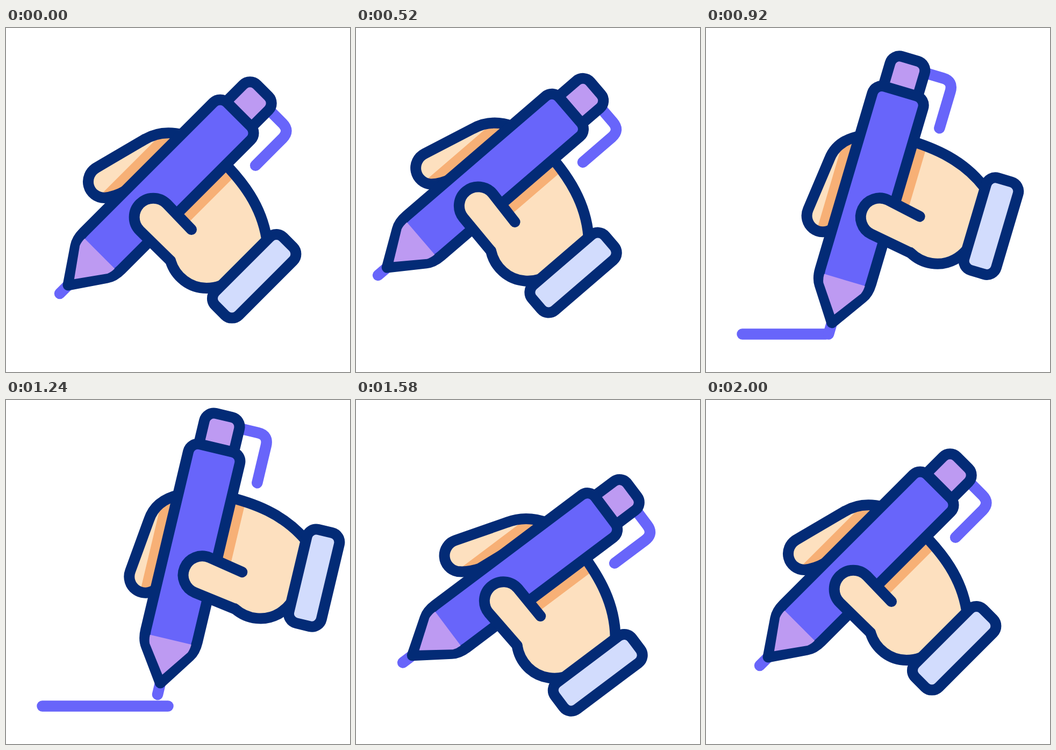
An HTML page that plays this animation: 640x640 px, repeating every 2320 ms.

```html
<!DOCTYPE html>
<html lang="en">
<head>
<meta charset="utf-8">
<title>Writing hand</title>
<style>
  html, body { margin: 0; width: 100%; height: 100%; overflow: hidden; background: #fff; }
  svg { display: block; width: 100%; height: 100%; }
  .outline { stroke: #032b76; stroke-width: 20; }
  .ink { stroke: #6865fa; stroke-width: 20.5; fill: none; }
  .skin { fill: #fde0bf; }
  .lilac { fill: #bd9af2; }
</style>
</head>
<body>
<svg viewBox="0 0 640 640" fill="none" stroke-linecap="round" stroke-linejoin="round">
  <defs>
    <path id="finger"/>
    <path id="palm" d="M300 340 L400 245 C440 285 475 330 485 392 L490 397 L405 484 L400 479 Q387 484 373 484 C342 484 315 463 306 433"/>
    <clipPath id="hand"><use href="#finger"/><use href="#palm"/></clipPath>
  </defs>

  <path id="line" class="ink"/>

  <!-- the origin of this group is the tip of the refill -->
  <g id="rig">
    <g transform="translate(-100 -494)">
      <g class="skin"><use href="#finger"/><use href="#palm"/></g>
      <g clip-path="url(#hand)">
        <rect transform="translate(100 494) rotate(-45)" y="-76" width="500" height="152" fill="#f7b076"/>
      </g>
      <g class="outline"><use href="#finger"/><use href="#palm"/></g>
    </g>

    <g transform="rotate(-45)">
      <path class="ink" d="M0 0 H22 M517 40 V69 Q517 89 497 89 H426"/>
      <g class="outline">
        <rect class="lilac" x="440" y="-33.4" width="94" height="66.8" rx="18"/>
        <path fill="#6865fa" d="M22 0 L83 -41.500 Q94 -49.200 112 -49.200 H453.300 A18 18 0 0 1 471.300 -31.200 V31.200 A18 18 0 0 1 453.300 49.200 H112 Q94 49.200 83 41.500 Z"/>
      </g>
      <path class="lilac" d="M38 0 L89 -36.500 Q96 -39.500 105 -39.500 V39.500 Q96 39.500 89 36.500 Z"/>
      <rect class="outline" fill="#d2dcfd" x="189" y="202" width="179" height="62" rx="18"/>
    </g>

    <g transform="translate(-100 -494)">
      <path id="thumb" class="skin outline" d="M345 375 L299 327 A35 35 0 0 0 249 377 L306 433"/>
    </g>
  </g>
</svg>
<script>
  const LOOP = 2320, STEP = 20;
  const LEFT = 67.5, RIGHT = 301.5, LINE_Y = 569.5;
  const LAND = 690, LIFT = 1100, FADE = 1260, GONE = 1570;

  // time, tip x, tip y, counterclockwise turn and finger bend in degrees
  const keys = [
    [200, 100, 494, 0, 0],
    [520, 41, 460, -4.3, 1.5],
    [600, 26.5, 490, 2, 3.5],
    [LAND, LEFT, LINE_Y, 16, 6],
    [740, 96, LINE_Y, 20.5, 7.2],
    [920, 228, LINE_Y, 28.5, 9.6],
    [LIFT, RIGHT, LINE_Y, 34.7, 10],
    [1240, 282, 548, 31.6, 9.4],
    [1320, 261, 526, 26, 8],
    [1440, 165, 512, 8.8, 2.9],
    [1610, 83, 487, -9, -4],
    [1760, 92, 490, -4.1, -3.2],
    [1820, 94.5, 492, -2.1, -1.9],
    [2000, 100, 494, 0, 0]
  ];

  const slope = (i, c) => (keys[i + 1][c] - keys[i][c]) / (keys[i + 1][0] - keys[i][0]);

  // monotone tangent: flat at turning points and at both ends
  function tangent(i, c) {
    if (i === 0 || i === keys.length - 1) return 0;
    const a = slope(i - 1, c), b = slope(i, c);
    return a * b > 0 ? 2 * a * b / (a + b) : 0;
  }

  function valueAt(t, c) {
    const last = keys.length - 1;
    if (t <= keys[0][0]) return keys[0][c];
    if (t >= keys[last][0]) return keys[last][c];
    const i = keys.findIndex(k => k[0] > t) - 1;
    const span = keys[i + 1][0] - keys[i][0], s = (t - keys[i][0]) / span;
    const p = keys[i][c], q = keys[i + 1][c];
    return p + (q - p) * s * s * (3 - 2 * s)
      + span * s * (1 - s) * (tangent(i, c) * (1 - s) - tangent(i + 1, c) * s);
  }

  const smooth = s => {
    s = Math.min(1, Math.max(0, s));
    return s * s * (3 - 2 * s);
  };

  // the finger swings about its knuckle while its root stays behind the pen
  function fingerPath(bend) {
    const a = -bend * Math.PI / 180, cos = Math.cos(a), sin = Math.sin(a);
    const swing = (x, y) => {
      const dx = x - 256, dy = y - 200;
      return `${256 + dx * cos - dy * sin} ${200 + dx * sin + dy * cos}`;
    };
    return `M340 200 L330 199 Q${swing(288, 188)} ${swing(255, 209)} L${swing(168, 260)}`
      + `A30 30 0 0 0 ${swing(183, 316)} Q${swing(203, 314)} ${swing(222, 303)} Z`;
  }

  const [rig, line, finger, thumb] =
    ['rig', 'line', 'finger', 'thumb'].map(id => document.getElementById(id));

  function draw() {
    const t = Math.floor(performance.now() % LOOP / STEP) * STEP;
    const [x, y, turn, bend] = [1, 2, 3, 4].map(c => valueAt(t, c));
    rig.setAttribute('transform', `translate(${x} ${y}) rotate(${-turn})`);
    thumb.setAttribute('transform', `rotate(${bend} 304 430)`);
    finger.setAttribute('d', fingerPath(bend * 0.85));

    const start = LEFT + (RIGHT - LEFT) * smooth((t - FADE) / (GONE - FADE));
    const end = t < LIFT ? x - 5 * smooth((t - LAND) / 100) : RIGHT;
    line.setAttribute('d', t > LAND && t < GONE ? `M${start} ${LINE_Y}H${end}` : '');
    requestAnimationFrame(draw);
  }
  draw();
</script>
</body>
</html>
```
